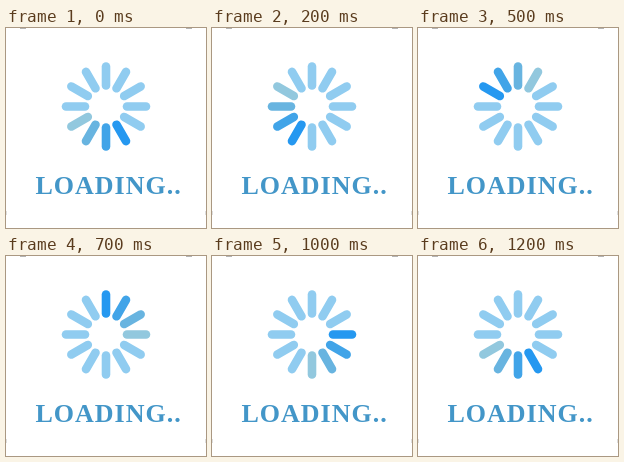
Recreate the animation shown at these times as an HTML page with a canvas. Size 200 by 200 pixels, loop 1.22 s.

```html
<!DOCTYPE html>
<html lang="en">
<head>
<meta charset="utf-8">
<title>Loading</title>
<style>
html, body { margin: 0; width: 100%; height: 100%; overflow: hidden; background: #fff; }
canvas { display: block; width: 200px; height: 200px; }
</style>
</head>
<body>
<canvas id="stage" width="200" height="200"></canvas>
<script>
const ctx = document.getElementById('stage').getContext('2d');
const LOOP = 1220, STEP = 100, SPOKES = 12;
const TRAIL = ['#2598f0', '#41a4e8', '#68b4e0', '#92c8de'];
const REST = '#90ccf0';

function spoke(i, color) {
  ctx.save();
  ctx.translate(100, 78.5);
  ctx.rotate(i * 2 * Math.PI / SPOKES);
  ctx.strokeStyle = color;
  ctx.lineWidth = 8.6;
  ctx.lineCap = 'round';
  ctx.beginPath();
  ctx.moveTo(0, -21);
  ctx.lineTo(0, -40);
  ctx.stroke();
  ctx.restore();
}

function corners() {
  ctx.fillStyle = '#b4b4b4';
  ctx.fillRect(14, 0, 6, 1);
  ctx.fillRect(180, 0, 6, 1);
  ctx.fillStyle = '#dedede';
  ctx.fillRect(0, 183, 1, 4);
  ctx.fillRect(199, 183, 1, 4);
}

function label() {
  ctx.fillStyle = '#4396c8';
  ctx.font = 'bold 26px "Liberation Serif", "Times New Roman", serif';
  ctx.letterSpacing = '1px';
  ctx.fillText('LOADING..', 29.5, 166);
}

function draw(t) {
  ctx.fillStyle = '#fff';
  ctx.fillRect(0, 0, 200, 200);
  corners();
  const head = 5 + Math.floor(t / STEP);
  for (let i = 0; i < SPOKES; i++) {
    const ahead = (i - head + 2 * SPOKES) % SPOKES;
    spoke(i, TRAIL[ahead] || REST);
  }
  label();
}

const start = performance.now();
function frame() {
  draw((performance.now() - start) % LOOP);
  requestAnimationFrame(frame);
}
frame();
</script>
</body>
</html>
```
